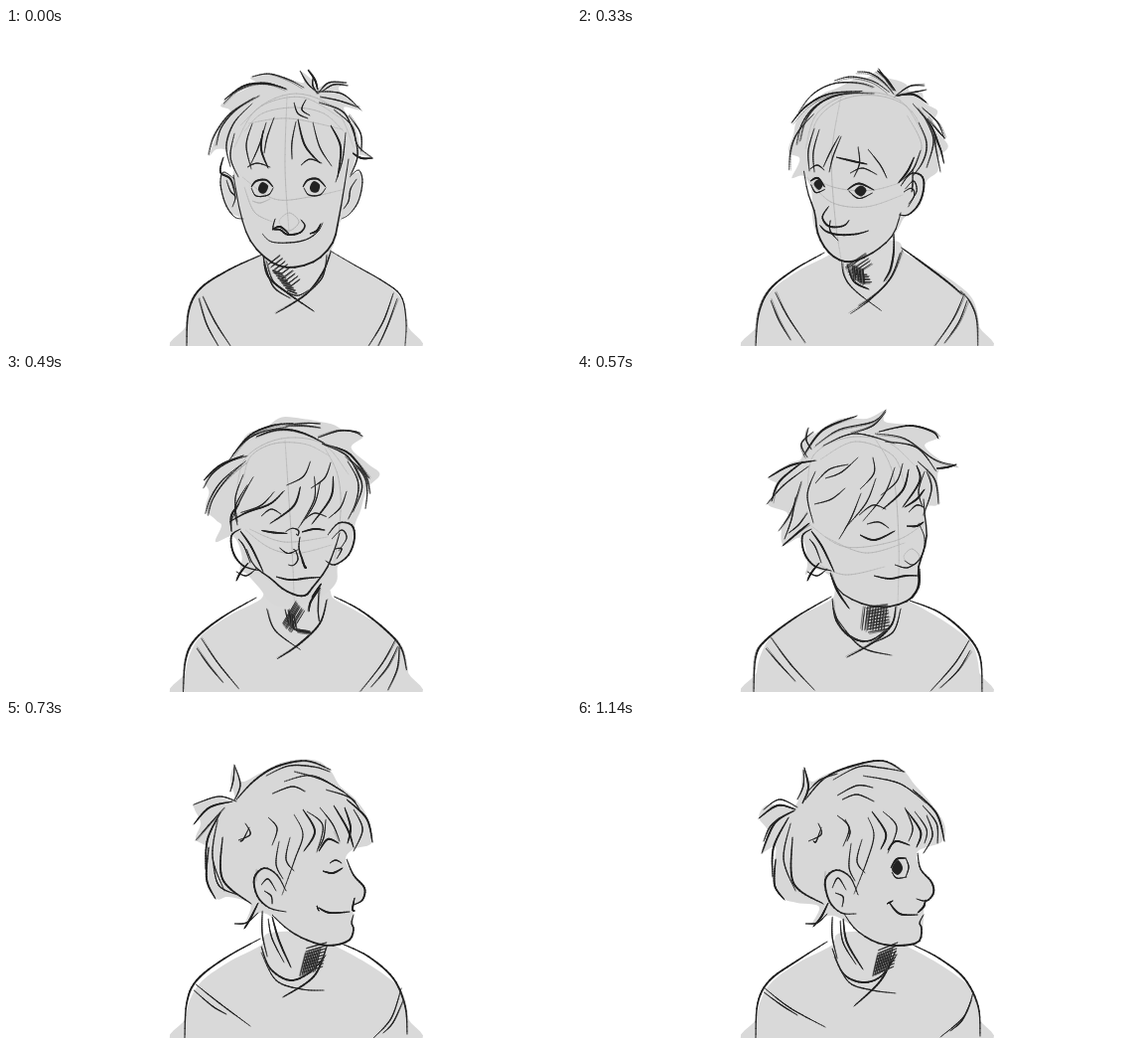
These frames come from a looping animation (569 px wide and 320 px high, 1.35 s). An HTML page with a canvas:

```html
<!DOCTYPE html>
<html lang="en">
<head>
<meta charset="utf-8">
<title>Head turn</title>
<style>
html, body { margin: 0; width: 100%; height: 100%; overflow: hidden; background: #fff; }
canvas { display: block; width: 569px; height: 320px; }
</style>
</head>
<body>
<canvas id="stage"></canvas>
<script>
// Strokes are points split by "|". Marks: * bold, ~ thin, @ solid, # hatching.
const torso = '181,326 181,300 186,280 198,262 225,243 256,227 266,214 320,214 330,226 352,238 382,257 399,274 405,300 403,326';

const front = {
  rough: 3,
  head: '262,232 246,214 238,193 224,184 216,160 219,146 229,148 224,125 212,122 205,128 213,105 226,84 216,78 232,66 252,56 246,50 265,46 288,52 300,55 297,44 308,52 314,60 328,53 343,55 335,62 357,82 340,80 352,100 358,122 369,131 354,128 350,145 358,146 358,165 348,184 337,194 330,218 318,232 290,241',
  hair: `248,49 265,46 285,52 300,60|219,76 235,62 260,55 283,62|*220,72 240,58 262,56 282,61|
    204,128 210,108 226,86 250,70|212,118 217,100 232,82 255,68|226,140 222,118 230,95 248,76|*219,130 216,145 226,152 231,168|
    296,43 303,55 312,64|309,50 309,58 314,66|*304,42 311,52 314,62|314,66 325,55 343,55|318,64 330,57 344,58|
    312,64 338,66 357,82|316,69 335,73 355,80|315,75 340,85 351,108|330,82 348,98 354,118 369,131|*349,126 358,131 369,131|350,102 354,128 347,148|345,88 357,106 358,124`,
  fringe: `248,96 242,118 247,142|262,95 255,118 246,138|*259,103 257,122 264,141|270,90 263,110 260,126|292,94 288,115 288,132|
    *294,92 301,118 316,136|309,95 316,120 328,139|*327,98 337,120 334,150|342,105 339,132 332,155|230,106 226,130 234,150|290,75 294,86 304,91|302,72 298,82 306,88`,
  ears: '230,152 219,145 216,157 221,177 230,190 239,192|222,153 226,164 231,170 228,180|346,150 355,143 359,154 355,174 346,187 338,192|353,152 347,162 345,174 340,182',
  face: `*229,148 237,190 248,217 268,236 288,241 312,234 329,216 335,192 340,164 345,132|*247,160 252,154 262,153 269,160|243,140 253,136 266,140|
    *271,192 269,202 276,203 284,208 296,206 301,199 297,193|258,207 267,215 285,216 302,213 314,205 319,196|*299,160 304,153 314,152 322,160|
    297,138 306,132 318,136|@254,161 258,155 264,159 261,166 256,166|@306,160 310,154 316,158 314,165 308,165|247,161 252,169 264,168 269,161|300,161 305,168 316,168 322,161|*306,207 313,204 317,197|*268,203 276,200 285,207`,
  body: `*258,228 225,243 196,262 184,285 182,320|326,224 350,238 380,255 398,270 403,295 402,320|198,270 210,295 226,320|194,272 202,298 214,320|390,267 380,295 365,320|394,272 384,300 375,320|
    *259,229 264,250 284,267 310,285|262,234 270,256 291,269 305,264|*327,225 319,246 302,268 272,287|260,235 269,260 286,272|323,228 318,252 296,273|#264,238 284,262 12,-9|#268,244 283,264 10,3`,
  guide: '~283,68 281,140 285,205|~238,150 270,172 306,170 342,162|~240,104 258,86 290,80 320,86 340,104|~236,98 262,76 300,70 336,90|~230,120 252,82 292,66 332,82 350,120|~244,96 285,91 339,102|~240,160 250,185 268,195|~@275,195 285,186 295,195 285,204|~248,174 256,176 266,172'
};

const left = {
  rough: 4,
  head: '266,233 244,216 235,195 232,172 229,150 224,135 218,135 221,110 215,93 228,76 240,62 262,52 276,44 300,44 310,50 316,42 316,56 349,62 338,70 352,82 368,100 371,113 366,118 379,132 362,135 372,150 350,150 348,170 336,186 327,195 318,215 296,230',
  hair: `262,52 276,48 294,51 308,60|276,44 292,42 308,51 316,63|315,41 308,50 316,64|*312,44 312,54 319,64|350,62 336,58 318,66|350,64 336,70 320,67|
    *215,93 230,77 252,66 288,63|218,88 230,69 256,55 288,57 302,62|225,137 224,112 234,88 258,70 284,65|217,136 220,110 235,85|232,130 234,100 250,77 280,67 312,68|
    *318,66 338,74 350,90|345,76 362,92 371,113|*346,85 358,110 379,132|336,74 352,98 358,124 372,150|348,92 358,114 354,145|352,112 350,132 336,148|356,98 364,110 372,112`,
  fringe: `240,98 236,118 240,140|250,100 246,122 250,142|258,95 252,112 262,132|*260,114 268,132 292,152|274,117 281,136 296,154|262,96 258,120 274,142|285,132 300,144 318,148|356,126 345,142 330,154|*343,140 334,146 327,156|340,164 344,172 354,174`,
  ears: '*328,156 337,143 347,147 346,165 338,182 327,188|333,158 340,151 341,164 333,176|330,164 337,168 332,182',
  face: `*228,138 231,165 235,192 243,215 256,229 272,235 290,232 312,219 325,203 329,178|*240,155 246,150 253,157|239,140 248,136 255,140|
    *259,181 253,190 256,199 268,201 282,197|*244,192 250,202 265,207 286,207 299,202|*281,160 290,154 305,161|282,139 295,134 308,142|
    @243,157 247,152 251,157 247,163|@288,161 293,156 298,161 293,167|240,157 245,165 254,161|282,161 291,169 304,164|266,181 263,190 268,197|*246,194 251,199`,
  body: `*250,226 220,243 196,262 184,285 181,320|*327,222 350,240 378,262|376,259 390,266 401,286 404,320|201,265 212,290 230,318|196,272 203,295 213,316|390,270 380,295 363,320|393,278 385,300 371,320|
    266,233 268,248 280,264 308,284|*272,235 276,252 290,268|*320,213 320,232 312,252 296,270|331,225 318,252 300,272 276,287|326,232 312,260 292,272|#270,238 280,260 18,-8|#276,238 292,238 -4,22`,
  guide: '~268,66 263,130 268,204 274,234|~231,150 255,176 294,178 330,162|~234,154 262,166 304,168 332,154|~236,124 242,94 270,72 312,72 344,92 354,124|~228,125 240,84 280,64 325,74 350,110|~320,88 342,118 338,140'
};

const down = {
  rough: 3,
  head: '270,236 252,224 243,205 241,192 243,176 232,162 214,166 228,150 212,155 210,140 205,125 208,108 220,90 232,78 258,53 280,50 290,42 312,46 322,60 350,54 342,62 356,62 345,76 360,92 370,110 364,132 350,145 351,168 342,188 325,194 322,205 308,215 292,228',
  hair: `*256,54 276,50 302,56 321,69|293,42 310,47 322,62|288,44 303,52 322,70|324,70 335,59 350,54|354,60 340,60 325,70|*228,82 248,62 276,54 296,57|
    217,98 232,80 255,67 286,64|204,126 209,105 226,87 246,78|210,150 212,128 222,106 242,88|*205,110 216,92 238,77|216,154 216,132 230,104 250,82|
    *326,72 346,82 356,95 370,112|340,78 362,100 365,120 360,140|352,88 360,112 350,136|336,78 352,105 350,132 340,150|350,84 364,98 369,110|330,74 346,92 352,115`,
  fringe: `258,109 241,130 214,150|*290,120 272,138 238,149 212,166|280,108 300,106 315,92|308,108 320,101 326,88|*292,122 288,136 262,146|246,125 230,145 228,154|270,122 258,138 234,148|
    313,122 311,142 300,163|*325,110 326,132 308,166|301,112 311,132 306,154|336,120 332,142 320,156|*216,167 222,163 229,164|238,104 230,128 228,148`,
  ears: '*324,162 335,150 348,152 351,165 345,182 331,192 322,188|328,166 338,157 343,165 335,178|331,176 338,176 333,186',
  face: `*229,150 234,166 244,180 242,198 248,219 260,233 273,236 293,227 312,212 323,194|*230,153 239,152 246,163|230,144 236,140 243,146|
    *248,178 241,190 247,198 256,200 267,197 266,190|*245,205 262,209 288,206|*264,165 278,159 293,165|268,153 280,148 296,153|
    @234,157 239,153 244,159 240,163|@271,167 279,161 285,166 279,172|231,158 236,166 245,164|265,167 277,174 291,168|*244,206 247,218 258,231`,
  body: `*248,226 215,245 192,265 182,290 179,320|*326,220 355,240 385,262 399,275|396,270 404,295 403,320|198,267 212,290 230,315|194,276 204,294 217,312|390,265 378,290 358,320|393,270 384,292 369,314|
    267,236 274,258 305,285|*325,220 315,250 290,275 275,288|272,240 282,258 298,258|*320,198 313,222 319,242|*322,190 325,214|318,202 318,228 322,240|#270,244 282,262 24,-20|#278,240 293,258 8,8`,
  guide: '~264,70 250,125 252,180 258,232|~232,150 256,174 288,182 326,174|~240,148 270,158 318,158|~232,118 245,86 282,66 326,72 350,110|~246,92 268,76 310,72|~345,88 352,118 338,150'
};

const dip = {
  rough: 4,
  head: '272,230 258,206 240,196 230,202 232,190 226,165 208,172 206,156 212,140 192,131 204,113 193,104 214,90 226,85 228,68 240,60 265,45 292,45 311,36 310,48 340,52 364,63 350,72 368,88 383,92 364,98 364,130 352,135 352,165 344,190 344,212 336,227 312,235',
  hair: `*228,82 248,56 282,42|240,72 264,56 298,48 311,36|276,60 298,52 311,38|232,84 226,70 238,58|236,76 231,66 233,54|*304,58 335,52 358,58 364,65|300,60 330,65 360,86 382,92|*362,95 372,94 382,91|
    310,68 342,74 362,98|*240,87 215,92 193,104|233,93 208,112 191,131|*228,88 204,108 196,128|226,108 216,138 203,158|220,124 216,146 209,166|*234,150 222,160 207,173|232,140 223,152 213,160|
    343,88 360,106 364,131|352,98 357,116 349,142|248,72 280,60 320,70`,
  fringe: `240,110 254,96 273,91|250,105 266,99 283,84|239,131 256,126 270,115|285,116 299,100 298,84|286,120 276,145 264,166|301,105 291,130 270,155|320,94 310,120 288,148|*334,96 328,117 308,136|
    *342,92 345,108 328,134|350,98 344,118 348,134|*350,116 342,126 330,134|328,90 322,108 306,122|240,98 232,122 238,150`,
  ears: '*236,156 227,163 229,180 239,193 256,198|*236,158 247,174 259,199|234,166 240,174 246,190|*244,190 236,200 232,208|252,196 242,203 232,199',
  face: `*256,203 266,220 290,232 315,234 336,226 344,212 344,194 352,166 350,140 349,126|*285,162 300,167 320,158|284,142 298,132 311,136|
    344,150 350,165 348,181 339,192 330,188|*299,203 315,206 331,203 344,203|*332,153 342,153 349,149|334,139 342,132 349,134|*345,196 344,214 335,227|292,151 304,149 314,155|320,192 332,195 342,190`,
  body: `*256,224 220,245 190,268 180,285 178,320|*335,228 365,240 392,262 406,285 408,320|195,265 215,292 239,318|190,276 204,292 220,309|395,268 380,292 356,319|396,278 384,298 366,316|
    *255,200 262,218 274,236|*257,226 261,248 276,265 296,268 318,252|*321,234 317,252 300,269 272,285|260,244 285,274 316,283|258,236 268,258 288,270|326,236 318,260 294,272|#291,236 293,260 22,-4|#290,234 312,234 -3,24`,
  guide: '~298,62 318,100 324,170 323,232|~236,153 270,174 320,168 349,151|~250,164 290,180 330,170|~232,120 238,82 272,64 312,68 340,92|~245,86 280,68 318,82 330,112|~@329,184 337,176 345,184 337,192|~240,190 270,202 310,194'
};

const side = {
  rough: 1.6,
  head: '284,210 262,195 252,196 242,203 246,185 224,178 212,180 202,160 203,130 191,120 196,104 190,90 190,84 212,78 230,80 226,60 230,47 237,62 255,54 280,42 310,40 326,50 336,66 352,80 364,98 369,123 350,130 342,140 350,156 362,170 358,182 350,188 350,200 350,212 344,224 320,227 300,220',
  hair: `*232,80 250,61 272,47 302,41 327,50|262,56 285,46 310,47 326,52|230,81 236,65 230,45|226,72 229,60 230,46|232,82 214,77 189,85|*228,82 205,88 189,105|220,88 204,106 191,121|
    *216,93 203,120 201,150|*204,128 202,160 211,180|213,100 208,138 220,172|*218,118 218,160 247,185|208,138 214,166 234,176|268,74 288,67 301,72|280,62 308,56 336,70 352,82|
    322,70 346,78 356,90|*343,80 363,99 369,123|350,90 359,110 350,132|290,52 318,60 340,72|*254,184 246,200 240,210|230,205 242,204 254,194`,
  fringe: `234,121 246,115 241,104|245,108 239,120 236,122|264,98 273,109 268,126|290,95 299,115 291,140 278,176|*299,90 311,112 300,132|303,92 319,106 313,133|316,88 329,105 336,122|
    *330,86 344,110 350,128|275,122 272,145 279,160|286,118 282,140 290,152|322,100 320,118 314,130|*341,88 347,108 344,124`,
  ears: '*282,172 273,156 260,149 250,159 253,177 265,189 282,193|257,166 264,160 272,172|260,172 267,177 268,185',
  face: `*268,196 283,210 302,221 325,227 345,222 350,211 348,204 350,196|*319,152 329,154 339,149|*315,132 324,120 335,124|
    *343,140 350,156 361,169 359,181 350,186|*315,189 326,194 346,193|*351,179 349,190 351,192|326,144 332,141 338,144|313,187 315,192`,
  body: `*256,220 220,240 192,262 182,285 180,320|*338,225 365,238 390,260 402,288 404,316|191,266 215,285 246,308|189,272 208,288 222,296|398,270 388,300 370,320|400,282 390,304 380,315|
    258,192 258,215 263,238|*268,198 275,222 287,249|*257,228 266,250 286,262 306,254 322,237|257,234 272,262 298,271 320,272|*323,228 310,258 279,279|264,200 268,220 280,244|#302,230 298,254 21,-6|#302,234 317,229 -6,24`,
  guide: '~252,150 252,162|~330,112 336,124'
};

const base = {
  rough: 1.2,
  head: '282,210 262,198 250,198 236,207 244,188 222,184 206,178 198,155 200,128 186,133 192,112 183,98 192,85 215,88 224,78 228,50 236,62 250,55 280,44 310,41 328,50 340,65 355,82 370,105 368,122 352,128 342,134 346,150 358,165 357,178 350,184 349,200 346,220 335,227 310,226',
  hair: `*230,80 250,58 278,46 308,41 329,52|258,60 284,47 306,48 330,52|*227,84 233,68 229,48|222,80 228,66 228,50|222,88 204,80 188,90|*220,90 202,86 183,99|*219,91 199,104 186,134|204,98 194,108 188,122|
    *213,98 198,128 197,158|*200,140 199,166 209,181|215,104 208,140 220,172|*217,118 218,164 248,185|267,80 282,75 299,82|262,76 282,66 298,68|288,56 325,64 352,84|*338,70 362,94 370,122|
    348,86 362,104 363,124|352,96 358,116 349,134|*253,184 246,198 238,208|230,205 242,204 252,195|232,72 245,60 262,54`,
  fringe: `233,122 246,115 243,104|246,108 241,122 238,122|262,96 274,108 268,127|270,100 275,112 272,122|293,98 299,116 292,142 279,175|*297,92 311,114 306,130|308,92 322,108 313,134|330,88 338,108 334,122|
    *331,90 346,112 342,128|276,124 274,148 280,162|287,120 282,142 290,154|340,92 352,110 350,124`,
  ears: '*283,176 275,158 261,151 250,161 254,182 266,194 281,195|257,169 263,159 271,171|260,174 268,178 267,188',
  body: `*252,223 222,242 194,262 182,285 180,320|*338,226 365,240 390,260 404,288 406,318|189,270 215,290 250,309|188,274 206,287 222,297|399,274 390,298 366,319|397,282 388,302 376,313|
    257,198 257,218 262,240|*268,200 272,224 288,251|265,202 268,224 281,246|*257,230 268,255 287,264 306,258 322,236|259,238 274,264 298,272 321,275|*321,232 306,262 279,288|#303,232 299,256 20,-8|#303,236 318,229 -5,22`,
  guide: '~250,152 249,168'
};
const jaw = '*269,195 281,211 302,224 325,227 344,223 347,210 345,204 349,196|';
const nose = '*343,134 346,150 357,163 359,174 352,182 342,180|';
const squint = { ...base, face: jaw + '*318,156 327,153 336,154|*313,137 321,126 336,127|' + nose +
  '*311,190 324,196 344,196|*351,180 349,189 344,195|330,134 334,143 332,151|@320,155 326,154 333,154 326,156|318,149 325,146 333,149|309,188 314,192' };
const open = { ...base, face: jaw + '*316,149 322,140 331,139|*313,131 321,122 335,126|' + nose +
  '*314,183 325,195 343,196|*351,181 349,188 343,194|331,139 334,148 331,158|@317,150 323,141 328,149 323,156|317,153 322,159 332,158|312,185 318,182' };

const groups = ['guide', 'body', 'hair', 'fringe', 'ears', 'face'];
const lerp = (a, b, k) => a + (b - a) * k;
const blend = (p, q, k) => p.map(([x, y], i) => [lerp(x, q[i][0], k), lerp(y, q[i][1], k)]);

function spline(pts, n, closed) {
  const len = pts.length, last = closed ? len : len - 1;
  const at = i => closed ? pts[(i + len) % len] : pts[Math.max(0, Math.min(last, i))];
  return Array.from({ length: n + 1 }, (_, j) => {
    const u = j / n * last, i = Math.min(Math.floor(u), last - 1), t = u - i;
    const [a, b, c, d] = [-1, 0, 1, 2].map(o => at(i + o));
    return [0, 1].map(k => b[k] + t / 2 * (c[k] - a[k] +
      t * (2 * a[k] - 5 * b[k] + 4 * c[k] - d[k] + t * (3 * (b[k] - c[k]) + d[k] - a[k]))));
  });
}

const points = s => s.match(/-?\d+,-?\d+/g).map(p => p.split(',').map(Number));

function parse(text) {
  return text.split('|').flatMap(s => {
    const pts = points(s);
    if (s.includes('#')) {
      const [a, b, [dx, dy]] = pts;
      return Array.from({ length: 9 }, (_, i) => {
        const x = lerp(a[0], b[0], i / 8), y = lerp(a[1], b[1], i / 8);
        return { pts: spline([[x, y], [x + dx, y + dy]], 24), width: 0.9 };
      });
    }
    const solid = s.includes('@'), thin = s.includes('~');
    return [{ pts: spline(pts, 24, solid), solid, thin, width: thin ? 0.7 : s.includes('*') ? 1.9 : 1.2 }];
  });
}

function build(src) {
  const pose = { rough: src.rough, head: spline(points(src.head), 200, true) };
  for (const g of groups) pose[g] = parse(src[g]);
  return pose;
}

function gap(p, q) {
  return p.reduce((sum, [x, y], i) => sum + (x - q[i][0]) ** 2 + (y - q[i][1]) ** 2, 0);
}

// Pairs each stroke with the closest one in the next drawing, in either direction.
function nearest(pts, others) {
  let best, least = Infinity;
  for (const o of others) for (const q of [o.pts, [...o.pts].reverse()]) {
    const d = gap(pts, q);
    if (d < least) { least = d; best = q; }
  }
  return best;
}

function mix(a, b, k, bothEars) {
  const pose = { rough: a.rough, head: blend(a.head, b.head, k) };
  for (const g of groups) {
    pose[g] = g === 'face'
      ? a.face.slice(0, b.face.length).map((s, i) => ({ ...s, solid: s.solid && b.face[i].solid, pts: blend(s.pts, b.face[i].pts, k) }))
      : a[g].map(s => ({ ...s, pts: blend(s.pts, nearest(s.pts, b[g]), k) }));
  }
  if (bothEars) pose.ears = [...a.ears, ...b.ears];
  return pose;
}

const [A, B, C, D, E, F, G] = [front, left, down, dip, side, squint, open].map(build);
const timeline = [
  [0, A], [250, B], [330, mix(B, C, 0.5)], [410, C], [490, mix(C, D, 0.5, true)], [570, D],
  [650, mix(D, E, 0.5)], [730, E], [900, F], [980, mix(F, G, 0.33)], [1060, mix(F, G, 0.67)], [1140, G]
];

const canvas = document.getElementById('stage');
const ctx = canvas.getContext('2d');
const scale = window.devicePixelRatio || 1;
canvas.width = Math.round(569 * scale);
canvas.height = Math.round(320 * scale);
ctx.scale(scale, scale);
ctx.lineCap = ctx.lineJoin = 'round';

function trace(pts) {
  ctx.beginPath();
  pts.forEach(([x, y]) => ctx.lineTo(x, y));
}

function fill(pts, color) {
  ctx.fillStyle = color;
  trace(pts);
  ctx.fill();
}

function pencil(pts, width, color) {
  ctx.strokeStyle = color;
  for (let i = 1; i < pts.length; i++) {
    ctx.lineWidth = width * (0.4 + 0.6 * Math.sin(Math.PI * i / pts.length));
    trace([pts[i - 1], pts[i]]);
    ctx.stroke();
  }
}

const torsoShape = spline(points(torso), 100, true);

function draw(pose) {
  let seed = 7;
  const wobble = () => ((seed = seed * 16807 % 2147483647) / 2147483647 - 0.5) * pose.rough;
  ctx.fillStyle = '#fff';
  ctx.fillRect(0, 0, 569, 320);
  fill(torsoShape, '#d9d9d9');
  fill(pose.head, '#d7d7d7');
  for (const g of groups) for (const { pts, solid, thin, width } of pose[g]) {
    if (solid && !thin) { fill(pts, '#222'); continue; }
    if (g === 'hair' || g === 'body') {
      const [x0, y0, x1, y1] = [wobble(), wobble(), wobble(), wobble()];
      pencil(pts.map(([x, y], i) => [x + lerp(x0, x1, i / 24), y + lerp(y0, y1, i / 24)]), 0.7, '#666');
    }
    pencil(pts, width, thin ? '#aaa' : '#202020');
  }
}

let shown;
function tick() {
  const t = performance.now() % 1350;
  const pose = timeline.filter(([start]) => start <= t).pop()[1];
  if (pose !== shown) draw(shown = pose);
  requestAnimationFrame(tick);
}
tick();
</script>
</body>
</html>
```
